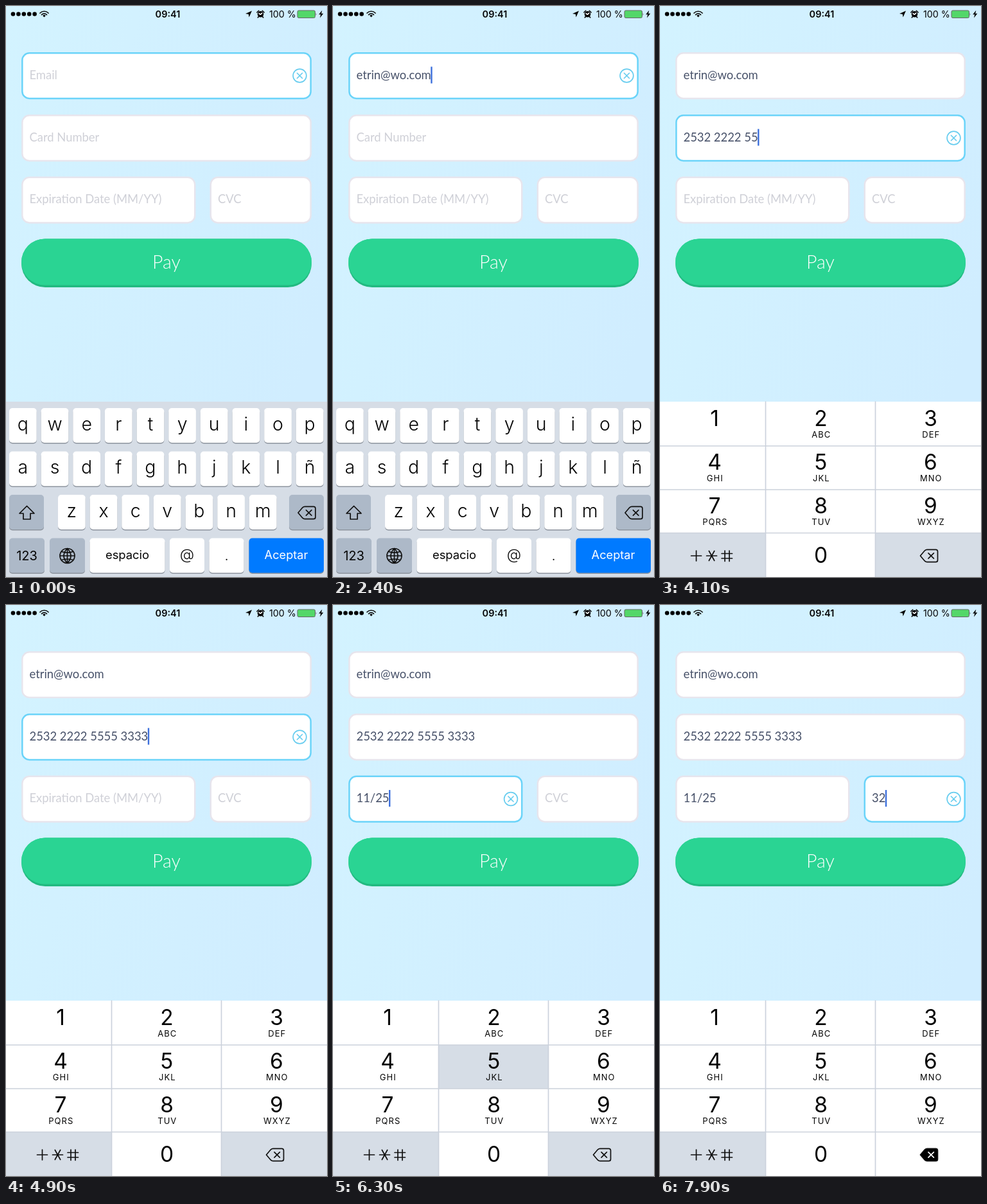
Animation, 500 px wide and 889 px high, one loop 8000 ms. Source, as an HTML page:

```html
<!DOCTYPE html>
<html lang="en">
<head>
<meta charset="utf-8">
<title>Payment form</title>
<style>
  html, body { margin: 0; width: 100%; height: 100%; overflow: hidden; background: #d2f0ff; }
  svg { display: block; width: 100%; height: 100%; }
  text { font-family: Inter, Roboto, sans-serif; fill: #050505; }
  .form { font: 400 18.4px Lato, "Open Sans", sans-serif; fill: #48526a; }
  .hint { fill: #cfd0d7; }
  .pay { font: 300 28.5px Lato, "Open Sans", sans-serif; fill: #fff; }
  .mid { text-anchor: middle; }
  .letter { font-size: 28.5px; font-weight: 300; }
  .big { font-size: 42px; font-weight: 300; }
  .digit { font-size: 33.5px; font-weight: 400; }
  .sub { font-size: 13px; letter-spacing: 1px; }
  .line { fill: none; stroke: #111; stroke-width: 1.7; stroke-linejoin: round; stroke-linecap: round; }
</style>
</head>
<body>
<svg id="stage" viewBox="0 0 500 889">
  <defs>
    <linearGradient id="sky" x2="1" y2="0.5">
      <stop offset="0" stop-color="#d3f3ff"/>
      <stop offset="1" stop-color="#d0edff"/>
    </linearGradient>
  </defs>
  <rect width="500" height="889" fill="url(#sky)"/>
</svg>
<script>
const LOOP = 8000;
const SWAP = 2600;
const PANEL = "#d6dde6";
const GREY = "#adb9c8";
const stage = document.getElementById("stage");

function add(parent, tag, attrs = {}, text) {
  const el = document.createElementNS("http://www.w3.org/2000/svg", tag);
  for (const k in attrs) el.setAttribute(k, attrs[k]);
  if (text !== undefined) el.textContent = text;
  parent.append(el);
  return el;
}
const group = (parent, x = 0, y = 0) => add(parent, "g", { transform: `translate(${x} ${y})` });
const rect = (parent, x, y, width, height, fill, rx = 0) =>
  add(parent, "rect", { x, y, width, height, fill, rx });
const label = (parent, x, y, cls, text, extra = {}) =>
  add(parent, "text", { x, y, class: cls, ...extra }, text);
const line = (parent, d, extra = {}) => add(parent, "path", { d, class: "line", ...extra });
const show = (el, on) => { el.style.display = on ? "" : "none"; };

function statusBar() {
  const bar = group(stage);
  for (let i = 0; i < 5; i++) add(bar, "circle", { cx: 11 + i * 8.4, cy: 12.5, r: 3.3 });
  const wifi = group(bar, 59.5, 17.5);
  for (const r of [5.5, 9]) {
    const s = r * 0.72;
    line(wifi, `M${-s} ${-s}A${r} ${r} 0 0 1 ${s} ${-s}`, { "stroke-width": 2.1, "stroke-linecap": "butt" });
  }
  add(wifi, "path", { d: "M0 0L-2.3 -2.6A3.4 3.4 0 0 1 2.3 -2.6Z" });
  label(bar, 252, 17.8, "mid", "09:41", { "font-size": 14.5, "font-weight": 600 });
  add(bar, "path", { d: "M383 7.5L378.6 17.5L377.8 12.8L373 12Z" });
  const alarm = group(bar, 396.5, 12.8);
  add(alarm, "circle", { r: 4.8 });
  line(alarm, "M-5.6 -2.8L-2.8 -5.4M5.6 -2.8L2.8 -5.4M-3 3.8L-4.2 5M3 3.8L4.2 5", { "stroke-width": 1.9 });
  line(alarm, "M-2.4 -1L0 .4L2.2 -1.6", { style: "stroke:#fff", "stroke-width": 1.1 });
  label(bar, 410, 17.8, "", "100 %", { "font-size": 14.3 });
  rect(bar, 454, 7, 27.5, 11.5, "#53d769", 2).setAttribute("stroke", "#666");
  add(bar, "path", { d: "M482.6 10.5Q484.4 12.7 482.6 15Z", fill: "#666" });
  add(bar, "path", { d: "M492.3 6.8L487.2 13.2H490.2L489 18.6L494.3 11.8H491.2Z" });
}

function makeField(x, y, width, hint) {
  const g = group(stage, x, y);
  const box = rect(g, 1.3, 1.3, width - 2.6, 70.6, "#fff", 11);
  box.setAttribute("stroke-width", 2.5);
  const hintEl = label(g, 12.5, 41.5, "form hint", hint);
  const textEl = label(g, 12.5, 41.5, "form", "");
  const caret = rect(g, 0, 22.5, 2.4, 26, "#3d70dc");
  const clear = group(g, width - 18.5, 36.5);
  line(clear, "M-10.4 0A10.4 10.4 0 1 1 10.4 0A10.4 10.4 0 1 1 -10.4 0M-4 -4L4 4M4 -4L-4 4",
    { style: "stroke:#68cdef", "stroke-width": 1.5 });
  return (text, focused, caretOn) => {
    box.setAttribute("stroke", focused ? "#6bd4f9" : "#e7e5ed");
    if (textEl.textContent !== text) textEl.textContent = text;
    show(hintEl, !text);
    show(clear, focused);
    show(caret, focused && caretOn);
    caret.setAttribute("x", 12 + (text ? textEl.getComputedTextLength() : 0));
  };
}

function payButton() {
  rect(stage, 24, 362.5, 452, 75.5, "#22ba80", 37);
  rect(stage, 24, 362.5, 452, 72, "#2ad493", 36);
  label(stage, 250, 408.5, "pay mid", "Pay");
}

function deleteIcon(parent, x, y) {
  const g = group(parent, x, y);
  const body = line(g, "M-13.5 0L-6.5 -8.2Q-5 -9.7 -3 -9.7H10.5Q13.5 -9.7 13.5 -6.7V6.7Q13.5 9.7 10.5 9.7H-3Q-5 9.7 -6.5 8.2Z");
  const cross = line(g, "M-1 -4.2L7.4 4.2M7.4 -4.2L-1 4.2");
  return on => {
    body.style.fill = on ? "#000" : "none";
    cross.style.stroke = on ? "#fff" : "#111";
  };
}

function keyboard() {
  const g = group(stage);
  const keys = {};
  rect(g, 0, 616, 500, 273, PANEL);
  const cap = (x, y, w, fill = "#fff") => {
    rect(g, x, y + 2, w, 53.5, "#8d949e", 5);
    rect(g, x, y, w, 54, fill, 5);
  };
  const letter = (ch, x, y, w = 42.7, size = 28.5, base = 34.5) => {
    cap(x, y, w);
    label(g, x + w / 2, y + base, "mid letter", ch, { style: `font-size:${size}px` });
    keys[ch] = { x, y, w };
  };
  [["qwertyuiop", 5, 626], ["asdfghjklñ", 5, 693.5], ["zxcvbnm", 81, 761]].forEach(([row, x, y]) =>
    [...row].forEach((ch, i) => letter(ch, x + i * 49.65, y)));

  cap(5, 761, 54, GREY);
  line(g, "M32.5 778.5L44 790H38V799H27V790H21Z");
  cap(441, 761, 54, GREY);
  deleteIcon(g, 468.5, 789)(false);

  cap(5, 828.5, 55, GREY);
  label(g, 32.5, 863, "mid", "123", { "font-size": 20 });
  cap(68, 828.5, 55, GREY);
  line(group(g, 95.5, 856), "M-11.5 0A11.5 11.5 0 1 1 11.5 0A11.5 11.5 0 1 1 -11.5 0M0 -11.5V11.5M-11.5 0H11.5" +
    "M0 -11.5Q-11 0 0 11.5M0 -11.5Q11 0 0 11.5M-9 -6.5Q0 -3.5 9 -6.5M-9 6.5Q0 3.5 9 6.5", { "stroke-width": 1.4 });
  cap(130.5, 828.5, 117);
  label(g, 189, 861, "mid", "espacio", { "font-size": 18.4 });
  letter("@", 255, 828.5, 54, 23, 33.5);
  letter(".", 316.5, 828.5, 54, 22, 34);
  cap(378.5, 828.5, 116.5, "#007aff");
  label(g, 436.5, 861, "mid", "Aceptar", { "font-size": 18.2, style: "fill:#fff" });

  // enlarged balloon above the pressed key
  const pop = group(g);
  const shape = add(pop, "path", { fill: "#fff", stroke: "#c3cad3", "stroke-width": 1 });
  const popText = label(pop, 0, 0, "mid big", "");
  return {
    show: on => show(g, on),
    press(ch) {
      const k = keys[ch];
      show(pop, !!k);
      if (!k) return;
      const { x, y, w } = k, l = x - 16.5, r = x + w + 16.5, top = y - 74;
      shape.setAttribute("d", `M${l + 10} ${top}H${r - 10}Q${r} ${top} ${r} ${top + 10}V${y - 22}` +
        `C${r} ${y - 6} ${x + w} ${y - 10} ${x + w} ${y + 8}V${y + 49}Q${x + w} ${y + 54} ${x + w - 5} ${y + 54}` +
        `H${x + 5}Q${x} ${y + 54} ${x} ${y + 49}V${y + 8}C${x} ${y - 10} ${l} ${y - 6} ${l} ${y - 22}` +
        `V${top + 10}Q${l} ${top} ${l + 10} ${top}Z`);
      popText.setAttribute("x", x + w / 2);
      popText.setAttribute("y", y - 26);
      popText.textContent = ch;
    }
  };
}

function numberPad() {
  const g = group(stage);
  const cols = [0, 164.5, 335.5, 500], rows = [616, 685, 753, 820.5, 889], mids = [85, 250.5, 421.5];
  const subs = ["", "ABC", "DEF", "GHI", "JKL", "MNO", "PQRS", "TUV", "WXYZ"];
  const cells = {};
  ["1", "2", "3", "4", "5", "6", "7", "8", "9", "sym", "0", "del"].forEach((key, i) => {
    const c = i % 3, r = Math.floor(i / 3);
    cells[key] = rect(g, cols[c], rows[r], cols[c + 1] - cols[c], rows[r + 1] - rows[r], "#fff");
    if (key.length > 1) return;
    label(g, mids[c], key === "0" ? 866.5 : 654 + r * 68, "mid digit", key);
    if (subs[i]) label(g, mids[c] + 0.8, 672 + r * 68, "mid sub", subs[i]);
  });
  line(g, "M0 685H500M0 753H500M0 820.5H500M164.5 616V889M335.5 616V889",
    { style: "stroke:#ccd2dc", "stroke-width": 1 });
  line(g, "M48.5 856H64.5M56.5 848V864M72.5 856H88.5M76.3 848.5L84.7 863.5M84.7 848.5L76.3 863.5" +
    "M96 852.5H112.5M96 860H112.5M101 848V864.5M108 848V864.5", { "stroke-width": 1.6 });
  const setDelete = deleteIcon(g, 419, 856);
  return {
    show: on => show(g, on),
    press(key) {
      for (const k in cells) {
        const dark = k.length > 1;
        cells[k].setAttribute("fill", dark !== (k === key) ? PANEL : "#fff");
      }
      setDelete(key === "del");
    }
  };
}

const card = s => s.replace(/(.{4})(?=.)/g, "$1 ");
const expiry = s => s.length < 2 ? s : s.slice(0, 2) + "/" + s.slice(2);
const plain = s => s;

statusBar();
// lead: how long before its character shows a key goes down
const fields = [
  { view: makeField(24, 72, 452, "Email"), from: 0, keys: "etrin@wo.com", format: plain, lead: 100,
    times: [500, 700, 900, 1100, 1300, 1600, 1800, 1900, 2100, 2200, 2300, 2400] },
  { view: makeField(24, 169, 452, "Card Number"), from: SWAP, keys: "2532222255553333", format: card, lead: 100,
    times: [3100, 3300, 3400, 3500, 3600, 3700, 3800, 3900, 4000, 4100, 4300, 4400, 4500, 4600, 4700, 4800] },
  { view: makeField(24, 265.5, 271.5, "Expiration Date (MM/YY)"), from: 5300, keys: "1125", format: expiry, lead: 0,
    times: [5700, 5900, 6100, 6300] },
  { view: makeField(317.5, 265.5, 158.5, "CVC"), from: 6800, keys: "321<", format: plain, lead: 0,
    times: [7200, 7400, 7600, 7800], hold: 200 }
];
payButton();
const letters = keyboard();
const digits = numberPad();

function draw(t) {
  let pressed = "";
  fields.forEach((f, i) => {
    const next = fields[i + 1];
    const focused = t >= f.from && (!next || t < next.from);
    let typed = "";
    f.times.forEach((at, n) => {
      const key = f.keys[n], down = at - f.lead, hold = key === "<" ? f.hold : 100;
      if (t >= at) typed = key === "<" ? typed.slice(0, -1) : typed + key;
      if (t >= down && t < down + hold) pressed = key === "<" ? "del" : key;
    });
    f.view(f.format(typed), focused, t >= 300);
  });
  const useLetters = t < SWAP;
  letters.show(useLetters);
  digits.show(!useLetters);
  (useLetters ? letters : digits).press(pressed);
}

const start = performance.now();
function tick() {
  // small lead so each step is already in place on its tenth of a second
  draw((performance.now() - start) % LOOP + 30);
  requestAnimationFrame(tick);
}
tick();
</script>
</body>
</html>
```
